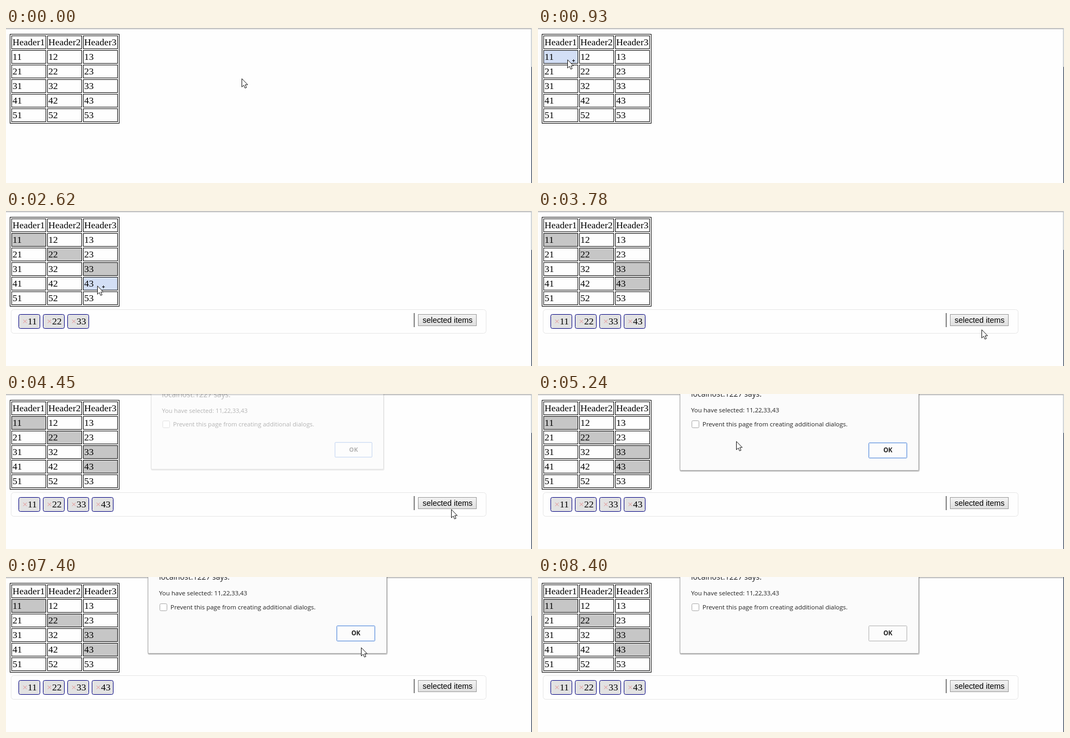
These frames come from a looping animation (969x287 px, 8.5 s). An HTML page:

```html
<!DOCTYPE html>
<html>
<head>
<meta charset="utf-8">
<style>
html, body { margin: 0; width: 100%; height: 100%; overflow: hidden; background: #fefefe; }
svg { display: block; }
text { white-space: pre; }
.serif { font: 17.6px "Liberation Serif", serif; }
.sans { font: 14.4px "Liberation Sans", sans-serif; }
.ui { font: 11.46px "Open Sans", sans-serif; fill: #222; }
.title { font-size: 14px; }
.bold { font-weight: 700; text-anchor: middle; }
</style>
</head>
<body>
<svg id="stage" width="969" height="287" viewBox="0 0 969 287"></svg>
<script>
const LOOP = 8500, TICK = 130;
const PRESS = 4180, OPEN = 4330, BLUR = 8400, LEAVE = 8090;
const stage = document.getElementById('stage');

// Pointer way points: time, x, y
const path = [
  [0, 434, 93], [390, 180, 107], [930, 54, 58], [1210, 54, 58], [1850, 145, 88],
  [2470, 168, 111], [2620, 168, 138], [2900, 168, 138], [3650, 822, 204], [3780, 817, 219],
  [4060, 820, 212], [4600, 820, 214], [4850, 673, 214], [5240, 365, 87], [5600, 299, 56],
  [6280, 388, 32], [6580, 429, 39], [7130, 530, 64], [7940, 901, 262], [LOOP, 901, 262]
];

// Clicks go down the diagonal and stop at the last column
const picks = [1210, 1720, 2470, 2900].map((time, row) => ({ time, row, col: Math.min(row, 2) }));

const rect = (x, y, w, h, fill, stroke = 'none', r = 0) =>
  `<rect x="${x}" y="${y}" width="${w}" height="${h}" rx="${r}" fill="${fill}" stroke="${stroke}"/>`;
const text = (x, y, s, cls) => `<text x="${x}" y="${y}" class="${cls}">${s}</text>`;
const inside = ([x, y], l, t, w, h) => x >= l && x < l + w && y >= t && y < t + h;
const gradient = (id, top, bottom) => `<linearGradient id="${id}" x2="0" y2="1">
  <stop stop-color="${top}"/><stop offset="1" stop-color="${bottom}"/></linearGradient>`;

// The pointer is sampled in ticks, so it moves in small jumps
function pointerAt(t) {
  const i = path.findIndex(key => key[0] > t);
  const [t0, x0, y0] = path[i - 1], [t1, x1, y1] = path[i];
  const steps = Math.round((t1 - t0) / TICK);
  const p = Math.floor((t - t0) / (t1 - t0) * steps + 1e-6) / steps;
  return [Math.round(x0 + (x1 - x0) * p), Math.round(y0 + (y1 - y0) * p)];
}

function table(tip, picked) {
  let out = rect(7.5, 11.5, 201, 165, 'none', '#000');
  for (let row = -1; row < 5; row++) for (let col = 0; col < 3; col++) {
    const x = 10 + col * 66, y = 41 + row * 27;
    const chosen = picked.some(p => p.row === row && p.col === col);
    const hover = row >= 0 && inside(tip, x, y, 66, 27);
    const label = row < 0 ? 'Header' + (col + 1) : `${row + 1}${col + 1}`;
    out += rect(x + .5, y + .5, 63, 24, chosen ? '#c6c6c6' : hover ? '#d3dff6' : 'none', '#000')
      + text(x + 2, y + 18, label, 'serif');
  }
  return out;
}

function panel(t, tip, picked) {
  if (!picked.length) return '';
  const tags = picked.map(({ row, col }, i) => {
    const x = 23 + i * 45;
    return rect(x + .5, 191.5, 39, 26, '#e2e2e2', '#000080', 3)
      + text(x + 7, 210, `<tspan fill="#e39c9c">×</tspan>${row + 1}${col + 1}`, 'serif');
  });
  const hover = t < OPEN && inside(tip, 759, 191, 108, 22);
  const face = !hover ? 'url(#face)' : t < PRESS ? 'url(#lit)' : '#e0e0e0';
  return rect(9.5, 182.5, 875, 44, 'none', '#e6e6e6', 5) + tags.join('')
    + rect(751, 189, 2, 26, '#808080')
    + rect(759.5, 191.5, 107, 21, face, '#999')
    + text(767.5, 207, 'selected items', 'sans');
}

function dialog(t) {
  if (t < OPEN) return '';
  const p = Math.min(1, (Math.floor((t - OPEN) / TICK) + 1) / 3);
  return `<g opacity="${p}" transform="translate(482 60) scale(${.96 + .04 * p}) translate(-482 -60)">`
    + rect(261, -10, 442, 154, 'rgba(0,0,0,.2)', 'none', 3)
    + rect(261.5, -10.5, 440, 152, '#fbfbfb', '#9c9c9c', 2)
    + text(282, 5, 'localhost:1227 says:', 'ui title')
    + text(282, 34, 'You have selected: 11,22,33,43', 'ui')
    + rect(283.5, 49.5, 13, 13, '#fff', '#a8a8a8', 2)
    + text(303, 60, 'Prevent this page from creating additional dialogs.', 'ui')
    + rect(609.5, 90.5, 70, 28, '#fcfcfc', t < BLUR ? '#3f7cd8' : '#b0b0b0', 1)
    + text(644.5, 108, 'OK', 'ui bold') + '</g>';
}

function pointer(t, tip) {
  if (t >= LEAVE) return '';
  const plus = inside(tip, 7, 11, 202, 166) ? '<path d="M9 2.5h5M11.5 0v5" stroke="#000"/>' : '';
  return `<g transform="translate(${tip})">
    <path d="M.5 .8V16.2L4 12.9 6.3 18.3 9 17.2 6.7 12H11.3Z" fill="#fff" stroke="#111"/>${plus}</g>`;
}

function frame(t) {
  const tip = pointerAt(t), picked = picks.filter(p => t >= p.time);
  stage.innerHTML = gradient('face', '#f4f4f4', '#dedede') + gradient('lit', '#fafafa', '#e8e8e8')
    + rect(0, 0, 969, 1, '#e4e4e4') + rect(0, 1, 968, 1, '#9c9c9c')
    + rect(967, 2, 1, 285, '#c8ccd0') + rect(968, 0, 1, 287, '#35435a')
    + (t < BLUR ? rect(968, 0, 1, 72, '#d8dce0') : '')
    + table(tip, picked) + panel(t, tip, picked) + dialog(t) + pointer(t, tip);
}

const start = performance.now();
function loop() {
  frame((performance.now() - start) % LOOP);
  requestAnimationFrame(loop);
}
loop();
</script>
</body>
</html>
```
